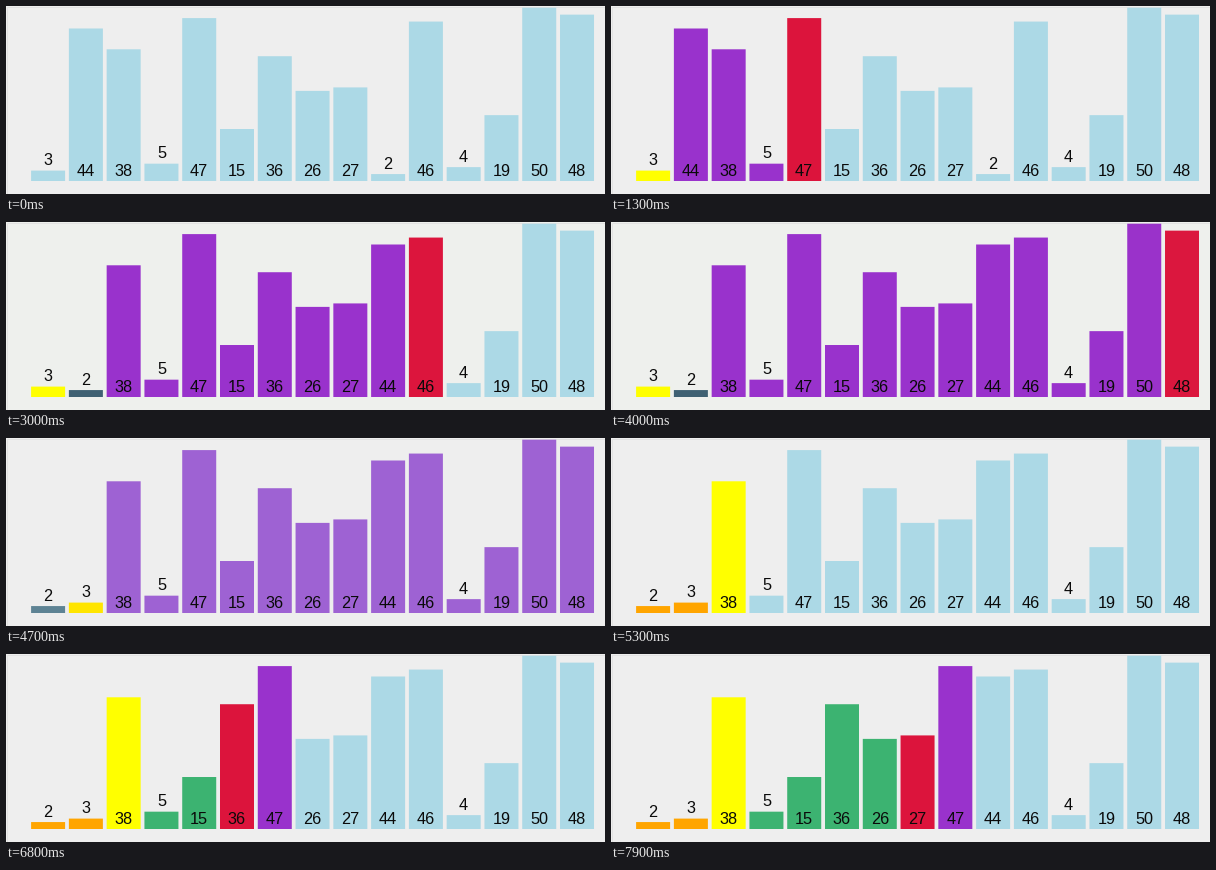
Recreate the animation shown at these times as a matplotlib script. Size 599 by 188 pixels, loop 8 s.

```python
from itertools import islice

import matplotlib.pyplot as plt
import numpy as np
from matplotlib.animation import FuncAnimation
from matplotlib.colors import to_rgb
from matplotlib.patches import Rectangle

W, H, DPI = 599, 188, 100
FRAMES, INTERVAL = 80, 100
START, STEP, EASE_MS = 110, 252, 130

LEFT, PITCH, BAR_W, BASE, UNIT = 25.1, 37.78, 34, 175, 3.466
FONT_PX = 16.2

VALUES = [3, 44, 38, 5, 47, 15, 36, 26, 27, 2, 46, 4, 19, 50, 48]
IDLE, CHECK, PIVOT, DONE = "#acd9e6", "#dc143c", "#ffff00", "#ffa500"
HIGH, LOW, LOW_FIRST = "#9932cc", "#3cb371", "#3f6173"
GREY, TINTED_GREY = "#eeeeee", "#eef0ed"


def quick_sort(order, tint, lo, hi):
    """Yield (order, tint) after every visible step of the sort."""
    def snap():
        return list(order), dict(tint)

    def swap(i, j):
        order[i], order[j] = order[j], order[i]

    if lo > hi:
        return
    if lo == hi:
        tint[order[lo]] = DONE
        yield snap()
        return

    low = LOW_FIRST if lo == 0 else LOW
    pivot, store = order[lo], lo
    tint[pivot] = PIVOT
    yield snap()
    for i in range(lo + 1, hi + 1):
        value = order[i]
        tint[value] = CHECK
        yield snap()
        if value < pivot:
            store += 1
            if i != store:
                swap(i, store)
                yield snap()
            tint[value] = low
        else:
            tint[value] = HIGH
    yield snap()
    swap(lo, store)
    yield snap()
    for value in order[lo:hi + 1]:
        tint[value] = IDLE
    tint[pivot] = DONE
    yield snap()
    yield from quick_sort(order, tint, lo, store - 1)
    yield from quick_sort(order, tint, store + 1, hi)


first = (list(VALUES), {v: IDLE for v in VALUES})
steps = quick_sort(list(VALUES), dict(first[1]), 0, len(VALUES) - 1)
n_steps = (FRAMES * INTERVAL - START) // STEP + 1
states = [first] + list(islice(steps, n_steps))


def ease(t):
    t = min(max(t, 0), 1)
    return 4 * t ** 3 if t < 0.5 else 1 - 4 * (1 - t) ** 3


fig = plt.figure(figsize=(W / DPI, H / DPI), dpi=DPI, facecolor=GREY)
ax = fig.add_axes([0, 0, 1, 1])
ax.set(xlim=(0, W), ylim=(H, 0))
ax.axis("off")
ax.add_patch(Rectangle((0.5, 0.5), W - 1, H - 1, fill=False,
                       ec="#e2e2e2", lw=72 / DPI))

bars, labels = {}, {}
for v in VALUES:
    top = BASE - v * UNIT
    bars[v] = ax.add_patch(Rectangle((0, top), BAR_W, v * UNIT, lw=0,
                                     snap=False, zorder=2))
    y = top - 11.3 if v < 10 else 163.7
    labels[v] = ax.text(0, y + 5.8, str(v), ha="center", va="baseline",
                        family="Liberation Sans", size=FONT_PX * 72 / DPI,
                        color="#0a0a0a", zorder=3)


def draw(frame):
    elapsed = frame * INTERVAL - START
    k = max(elapsed // STEP + 1, 0)
    t = ease((elapsed % STEP) / EASE_MS) if k else 1
    (order_a, tint_a), (order_b, tint_b) = states[max(k - 1, 0)], states[k]
    for v in VALUES:
        slot = (1 - t) * order_a.index(v) + t * order_b.index(v)
        x = LEFT + PITCH * slot
        colour = ((1 - t) * np.array(to_rgb(tint_a[v]))
                  + t * np.array(to_rgb(tint_b[v])))
        bars[v].set_x(x)
        bars[v].set_facecolor(colour)
        labels[v].set_x(x + BAR_W / 2)
    fig.set_facecolor(TINTED_GREY if LOW_FIRST in tint_b.values() else GREY)
    return [*bars.values(), *labels.values()]


anim = FuncAnimation(fig, draw, frames=FRAMES, interval=INTERVAL,
                     repeat=True, repeat_delay=0, blit=False)
plt.show()
```
